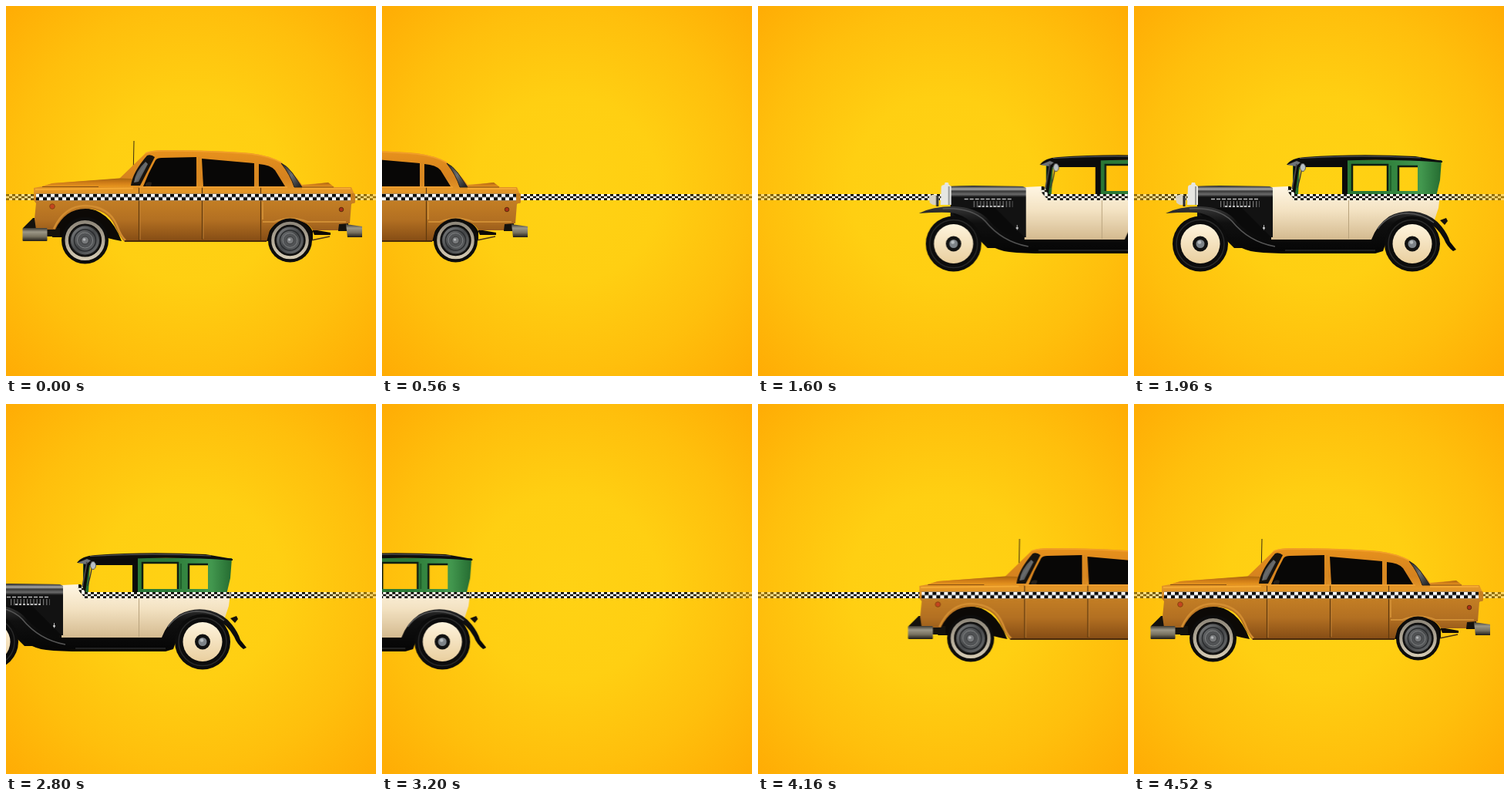
Write an HTML page without scripts that moves like this. It is 480 px wide and 480 px high and loops after 5.2 s.

```html
<!DOCTYPE html>
<html lang="en">
<head>
<meta charset="utf-8">
<title>Taxis</title>
<style>
html, body { margin: 0; width: 100%; height: 100%; overflow: hidden; background: #ffc20d; }
svg { display: block; width: 100%; height: 100%; }
.car { animation: 5200ms -4ms infinite step-end; }
.sedan { animation-name: sedan; }
.vintage { animation-name: vintage; }

/* each drive is 1000 ms in 40 ms steps */
@keyframes sedan {
  0% { transform: translateX(0); animation-timing-function: steps(25); }
  19.2308% { transform: translateX(-487.5px); }
  67.6923% { transform: translateX(481.5px); animation-timing-function: steps(25); }
  86.9231%, 100% { transform: translateX(0); }
}
@keyframes vintage {
  0% { transform: translateX(465.75px); }
  18.4615% { transform: translateX(465.75px); animation-timing-function: steps(25); }
  37.6923% { transform: translateX(0); }
  49.2308% { transform: translateX(0); animation-timing-function: steps(25); }
  68.4615%, 100% { transform: translateX(-441.75px); }
}
</style>
</head>
<body>
<svg viewBox="0 0 480 480">
  <defs>
    <radialGradient id="sky" gradientUnits="userSpaceOnUse" cx="240" cy="238" r="345">
      <stop offset="0" stop-color="#ffd214"/>
      <stop offset=".35" stop-color="#ffcf12"/>
      <stop offset=".68" stop-color="#ffbf0c"/>
      <stop offset="1" stop-color="#ffab04"/>
    </radialGradient>
    <linearGradient id="fade">
      <stop offset="0" stop-color="#fff" stop-opacity=".45"/>
      <stop offset=".2" stop-color="#fff"/>
      <stop offset=".8" stop-color="#fff"/>
      <stop offset="1" stop-color="#fff" stop-opacity=".4"/>
    </linearGradient>
    <mask id="ends"><rect y="240" width="480" height="16" fill="url(#fade)"/></mask>
    <pattern id="check" width="8" height="8" y="244" patternUnits="userSpaceOnUse">
      <rect width="8" height="8" fill="#fffdf0"/>
      <path d="M0 0h4v8h-4zM4 2.700h4v2.600h-4z" fill="#0c0a08"/>
      <path d="M0 2.700h4v2.600h-4z" fill="#fffdf0"/>
    </pattern>
    <pattern id="checkBig" width="10" height="9" x="3" y="243.5" patternUnits="userSpaceOnUse">
      <rect width="10" height="9" fill="#fff"/>
      <path d="M0 0h5v9h5v-4.500h-10z" fill="#090909"/>
    </pattern>

    <linearGradient id="paint" gradientUnits="userSpaceOnUse" x1="0" y1="187" x2="0" y2="307">
      <stop offset="0" stop-color="#e8921c"/>
      <stop offset=".3" stop-color="#d5821f"/>
      <stop offset=".44" stop-color="#e49728"/>
      <stop offset=".56" stop-color="#c27d24"/>
      <stop offset=".75" stop-color="#b37022"/>
      <stop offset="1" stop-color="#824a14"/>
    </linearGradient>
    <linearGradient id="hood" x2="0" y2="1">
      <stop offset="0" stop-color="#a9640f"/>
      <stop offset=".5" stop-color="#d07d18"/>
      <stop offset="1" stop-color="#ea981f"/>
    </linearGradient>
    <linearGradient id="chrome" x2="0" y2="1">
      <stop offset="0" stop-color="#3c3932"/>
      <stop offset=".3" stop-color="#9c9787"/>
      <stop offset=".65" stop-color="#77715f"/>
      <stop offset="1" stop-color="#1f1c16"/>
    </linearGradient>
    <linearGradient id="glass" x2="1" y2="1">
      <stop offset="0" stop-color="#26282a"/>
      <stop offset=".5" stop-color="#6b6d6e"/>
      <stop offset="1" stop-color="#17181a"/>
    </linearGradient>
    <linearGradient id="hub" x2="1" y2="1">
      <stop offset="0" stop-color="#808283"/>
      <stop offset=".5" stop-color="#454749"/>
      <stop offset="1" stop-color="#6d6f70"/>
    </linearGradient>
    <linearGradient id="wall" x2="0" y2="1">
      <stop offset="0" stop-color="#8f887b"/>
      <stop offset="1" stop-color="#d2c8b2"/>
    </linearGradient>

    <linearGradient id="cream" x2="0" y2="1">
      <stop offset="0" stop-color="#fff6e3"/>
      <stop offset=".45" stop-color="#f3e2c2"/>
      <stop offset="1" stop-color="#d3b98e"/>
    </linearGradient>
    <linearGradient id="disc" x2="0" y2="1">
      <stop offset="0" stop-color="#fff4dd"/>
      <stop offset="1" stop-color="#e9cf9f"/>
    </linearGradient>
    <linearGradient id="green" x2="1" y2="0">
      <stop offset="0" stop-color="#256c31"/>
      <stop offset=".6" stop-color="#2d7d3a"/>
      <stop offset=".86" stop-color="#43984f"/>
      <stop offset="1" stop-color="#256c31"/>
    </linearGradient>
    <linearGradient id="bonnet" x2="0" y2="1">
      <stop offset="0" stop-color="#222"/>
      <stop offset=".3" stop-color="#a3a3a3"/>
      <stop offset=".5" stop-color="#3b3b3b"/>
      <stop offset=".75" stop-color="#6b6b6b"/>
      <stop offset="1" stop-color="#101010"/>
    </linearGradient>
    <linearGradient id="black" x2="0" y2="1">
      <stop offset="0" stop-color="#383838"/>
      <stop offset=".35" stop-color="#101010"/>
      <stop offset="1" stop-color="#050505"/>
    </linearGradient>

    <g id="wheelA">
      <circle r="30.5" fill="#0d0c0b"/>
      <circle r="23.8" fill="none" stroke="url(#wall)" stroke-width="4.4"/>
      <circle r="20" fill="#1b1b1b"/>
      <circle r="18.5" fill="url(#hub)"/>
      <circle r="14" fill="none" stroke="#2b2d2f" stroke-width="1.6"/>
      <circle r="10" fill="#515355" stroke="#818384"/>
      <circle r="5" fill="#77797b" stroke="#38393a"/>
      <circle cx="-1" cy="-1" r="1.8" fill="#b2b4b5"/>
    </g>
    <g id="wheelB">
      <circle r="36" fill="#0c0c0c"/>
      <circle r="31" fill="none" stroke="#292929" stroke-width="1.5"/>
      <circle r="25.5" fill="url(#disc)"/>
      <circle r="10" fill="#111"/>
      <circle r="5.5" fill="#7d8388"/>
      <circle cx="-1" cy="-2" r="2.3" fill="#b8bdc0"/>
    </g>
  </defs>

  <rect width="480" height="480" fill="url(#sky)"/>
  <rect y="244" width="480" height="8" fill="url(#check)" mask="url(#ends)"/>

  <g class="car sedan">
    <!-- underside -->
    <path d="M60 300Q64 268 98 262Q134 262 150 305L140 303L128 300H62zM336 305Q344 276 370 276Q393 277 400 297H421V294L398 290V304z" fill="#0c0906"/>
    <path d="M396 304L420 299" stroke="#4a3512" stroke-width="1.5"/>
    <path d="M22 288L35 275H40V288H70V299H54z" fill="#15120d"/>
    <path d="M431 282H444V292H431z" fill="#15120d"/>
    <path d="M166 175L165 223" stroke="#3a2c10" stroke-width="1"/>
    <!-- body -->
    <path d="M36 243V236L47 234L60 230L147 224L181 191Q187 187 204 187Q270 187 318 191Q342 194 357 203Q372 215 384 232L418 229L425 235H448L452 244L453 254L448 257L446 282L432 283L431 291H398Q391 278 370 278Q350 278 342 291L338 306H154Q147 298 141 285Q131 263 103 263Q77 263 64 290H39L37 276L39 256L36 252z" fill="url(#paint)"/>
    <path d="M47 234L60 230L147 223.5L163 224L170 234L120 235z" fill="url(#hood)"/>
    <path d="M384 233L418 229L426 235z" fill="url(#hood)"/>
    <path d="M47 234.500H120M384 235H425" stroke="#8a5212" stroke-width="1"/>
    <path d="M38 238L165 236.500M384 237H447" stroke="#f4a933" stroke-width="2"/>
    <path d="M181 191Q187 188 204 188Q270 188 318 192Q342 195 357 203" fill="none" stroke="#f3a02a" stroke-width="1.500"/>
    <path d="M62 289Q76 259 103 259Q134 260 144 285Q149 299 155 304" fill="none" stroke="#d38d30" stroke-width="2.500"/>
    <path d="M333 280H348Q370 271 391 280H441M333 254V277" fill="none" stroke="#cf8d34" stroke-width="2"/>
    <path d="M172.5 234V304M254.5 234V303M330.5 235V304" fill="none" stroke="#5f390d" stroke-width="1.2"/>
    <path d="M174 252V303M256 252V302" stroke="#c4873a" stroke-width=".8"/>
    <path d="M154 305H338" stroke="#4a2a0a" stroke-width="2"/>
    <!-- windows -->
    <path d="M162 233Q164 216 183 194Q188 192 193 196L174 233z" fill="#17130e"/>
    <path d="M166 229Q168 214 181 202L184 205L172 228z" fill="url(#glass)"/>
    <path d="M178 234Q185 216 194 200Q196 197 202 197L247 196V234zM254 198L322 204V234H256zM328 205Q343 206 349 213L362 234H328z" fill="#080706"/>
    <path d="M357 204Q364 207 371 216L384 235H374Q369 219 357 204" fill="url(#glass)" stroke="#2a231a" stroke-width="1"/>
    <path d="M250.500 196V235M325 203V235" stroke="#d98a22" stroke-width="3"/>
    <path d="M172 235H365" stroke="#f0a233" stroke-width="1.6"/>
    <path d="M181 231Q183 227 189 229L188 234H181z" fill="#262019"/>
    <!-- trim -->
    <rect x="39" y="243.500" width="408" height="9" fill="url(#checkBig)"/>
    <rect x="447" y="243" width="6" height="13" rx="2" fill="#c87f20"/>
    <circle cx="60" cy="260" r="3.300" fill="#c4451f" stroke="#86460f"/>
    <circle cx="435" cy="264" r="2.800" fill="#a92f18" stroke="#5e2e0a"/>
    <rect x="21.500" y="288" width="32" height="17" rx="1" fill="url(#chrome)"/>
    <path d="M441 283L462 286V300H443z" fill="url(#chrome)"/>
    <use href="#wheelA" x="102.500" y="304"/>
    <use href="#wheelA" transform="translate(368.500 304) scale(.935)"/>
  </g>

  <g class="car vintage">
    <!-- cabin with open windows -->
    <path fill-rule="evenodd" d="M206 200H399L397 226L392 247H206zM215 209H270V244H213zM283 206H329V240H283zM343 208H368V240H343z" fill="url(#green)"/>
    <path fill-rule="evenodd" d="M207 199H277V244H270V209H214L209 244H206z" fill="#0b0b0b"/>
    <path d="M283 240V206H329V240M343 240V208H368" fill="none" stroke="#0f1d10" stroke-width="2.500"/>
    <path d="M333 207V240" stroke="#1b5426" stroke-width="1.500"/>
    <path d="M198 206Q204 197 222 196Q290 191 365 195L400 201V203Q350 199 290 200L220 202L212 207z" fill="#0d0d0d"/>
    <path d="M215 197.500Q290 192.500 372 197" fill="none" stroke="#565656" stroke-width="1.200"/>
    <path d="M199 206L211 201L216 203L210 208z" fill="#6f7377"/>
    <path d="M211 205L205 238" stroke="#474747" stroke-width="1.800"/>
    <path d="M217 204V214Q216 222 212 236" fill="none" stroke="#333" stroke-width="1.300"/>
    <ellipse cx="219" cy="209.500" rx="3.500" ry="5" fill="#b9c0c5" stroke="#555"/>
    <!-- body -->
    <path d="M178 235L199 234Q204 244 212 245H397L395 262L389 280L310 304H178z" fill="url(#cream)"/>
    <path d="M278.500 252V302" stroke="#b9a37d" stroke-width="1"/>
    <path d="M198 234H203L208 243V251L201 243z" fill="url(#check)"/>
    <path d="M207 244H397L396 252H207z" fill="url(#check)"/>
    <rect x="82" y="246" width="98" height="54" fill="#121212"/>
    <path d="M80 234Q95 232 176 234L180 236V248H80z" fill="url(#bonnet)"/>
    <path d="M100 250.500H163" stroke="#b9b9b9" stroke-width="1.500" stroke-dasharray="5 2"/>
    <path d="M112 257H163" stroke="#777" stroke-width="8" stroke-dasharray="1.200 3"/>
    <path d="M118 260H152" stroke="#bbb" stroke-width="2" stroke-dasharray="3 2"/>
    <path d="M168.500 284V299" stroke="#aaa" stroke-width="1"/>
    <circle cx="168.500" cy="288" r="1.500" fill="#ccc"/>
    <path d="M70 235Q70 232 74 232L75 229H79L80 232L83 234V258H69z" fill="#e6e6e2"/>
    <path d="M80 234V258" stroke="#999b9b" stroke-width="2"/>
    <path d="M54 247Q61 242 67 247V257Q59 260 55 255z" fill="#d9d3c2"/>
    <path d="M65 246V260" stroke="#292929" stroke-width="3"/>
    <!-- fenders and running board -->
    <path d="M78 262H140L178 300V314H130z" fill="#0a0a0a"/>
    <path d="M41 269Q58 260 86 260Q114 261 129 275Q151 301 178 303H308Q315 284 331 273Q350 263 371 268Q389 273 399 286Q407 296 410 306L418 316L414 318Q406 312 402 302Q393 285 375 278Q342 270 329 301L323 318L313 321H206Q176 321 158 319Q131 316 117 292Q105 271 82 268Q66 267 41 269z" fill="url(#black)"/>
    <path d="M72 263Q109 261 127 279Q149 306 183 312M316 289Q330 270 353 269Q374 269 389 281" fill="none" stroke="#555" stroke-width="1.600"/>
    <path d="M196 317H313" stroke="#3c3c3c" stroke-width="1.200"/>
    <path d="M397 278L405 275L407 279L403 284z" fill="#17110a"/>
    <use href="#wheelB" x="86" y="308.500"/>
    <use href="#wheelB" x="361" y="308.500"/>
  </g>
</svg>
</body>
</html>
```
